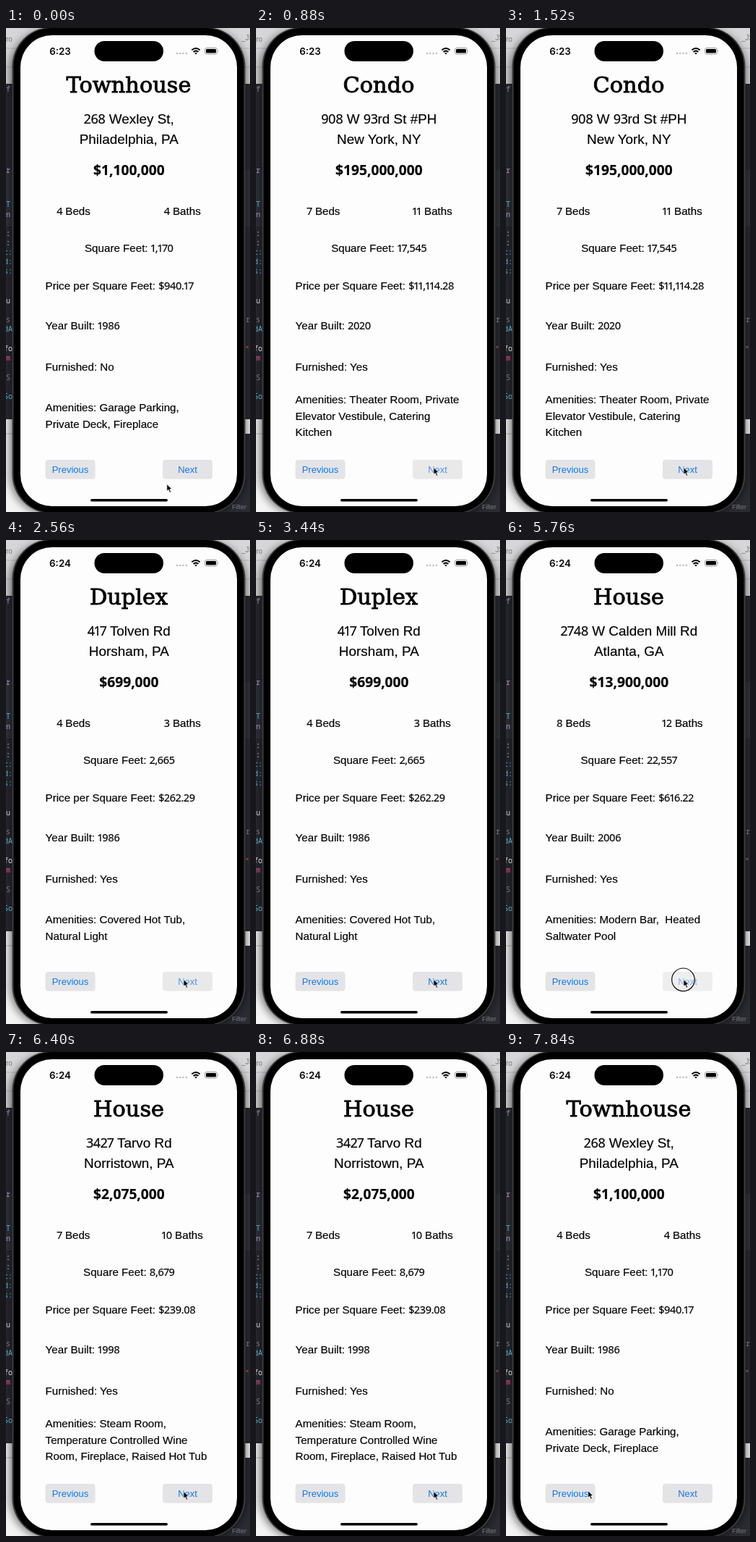
An HTML page for the animation above (8000 ms loop, 338 px wide and 668 px high).

```html
<!DOCTYPE html>
<html lang="en">
<head>
<meta charset="utf-8">
<title>Listings</title>
<style>
html, body { margin: 0; width: 100%; height: 100%; overflow: hidden; background: #26272d; }
svg { display: block; width: 338px; height: 668px; }
text { font-family: "Liberation Sans", Arial, sans-serif; font-size: 15.15px; fill: #050505; white-space: pre; }
#page text { stroke: #050505; stroke-width: .18px; }
#page .title { font-family: "DejaVu Serif", serif; font-size: 30.4px; stroke-width: .9px; }
.mid { text-anchor: middle; }
.num { font-family: "Noto Sans", sans-serif; font-size: .96em; letter-spacing: -.025em; font-variant-numeric: proportional-nums; }
.addr { font-size: 18.9px; }
.price { font-family: "Noto Sans", sans-serif; font-size: 19.2px; font-weight: 700; }
.btn { font-size: 13px; fill: #0a78f5; }
.clock { font-family: Inter, sans-serif; font-size: 13.4px; font-weight: 600; }
.code { font-family: "Noto Sans Mono", monospace; font-size: 10px; }
.ui { font-size: 10px; fill: #77777a; }
</style>
</head>
<body>
<svg viewBox="0 0 338 668">
  <defs>
    <filter id="blur" x="-20%" y="-20%" width="140%" height="140%"><feGaussianBlur stdDeviation="6"/></filter>
  </defs>

  <rect width="338" height="77" fill="#d6d6d8"/>
  <path d="M0 28H338M0 54H338" stroke="#b5b5b8"/>
  <rect y="77" width="338" height="463" fill="#2a2b33"/>
  <rect y="196" width="338" height="78" fill="#32343d"/>
  <rect y="540" width="169" height="128" fill="#f4f4f4"/>
  <rect x="169" y="540" width="169" height="20" fill="#f0f0f0"/>
  <rect x="169" y="560" width="169" height="108" fill="#2a2b33"/>
  <path d="M0 560H169" stroke="#bbb"/>
  <rect x="5" y="2" width="328" height="670" rx="56" opacity=".5" filter="url(#blur)"/>
  <g id="code"></g>
  <text class="ui" x="0" y="19">ro</text>
  <text class="ui" x="326" y="17">_JS</text>
  <text class="ui" x="313" y="664" style="font-size:9px">Filter</text>

  <rect x="8.5" y="-1" width="323" height="671" rx="54" fill="#3c3c3e"/>
  <rect x="10.5" y="0" width="319" height="669" rx="53"/>
  <rect x="20" y="10" width="300" height="650" rx="44" fill="#fdfdfd"/>
  <rect x="122.5" y="18" width="95.5" height="28" rx="14"/>
  <rect x="117" y="650" width="107" height="3.6" rx="1.8"/>

  <text class="clock mid" id="clock" x="75" y="36.5"></text>
  <g fill="#bdbdbf">
    <circle cx="237" cy="35" r="1.3"/><circle cx="241.3" cy="35" r="1.3"/>
    <circle cx="245.6" cy="35" r="1.3"/><circle cx="249.9" cy="35" r="1.3"/>
  </g>
  <g fill="none" stroke="#050505" stroke-width="2">
    <path d="M257.4 30.4Q263 25.6 268.6 30.4M259.6 33.1Q263 30.2 266.4 33.1"/>
    <path d="M261.2 34.8Q263 33.4 264.8 34.8L263 36.6Z" fill="#050505" stroke="none"/>
  </g>
  <rect x="275.5" y="27.5" width="17" height="8.6" rx="2.6" fill="none" stroke="#9c9c9e"/>
  <rect x="277" y="29" width="14" height="5.6" rx="1.4"/>
  <path d="M293.8 30.2q1.6 1.6 0 3.2z" fill="#9c9c9e"/>

  <g id="page"></g>

  <rect x="54.5" y="596" width="69" height="26.5" rx="4" fill="#e4e4e6"/>
  <rect id="nextBox" x="217" y="596" width="69" height="26.5" rx="4" fill="#e4e4e6"/>
  <text class="btn mid" x="89" y="614">Previous</text>
  <text class="btn mid" id="nextText" x="251.5" y="614">Next</text>

  <circle id="ring" cx="245.5" cy="606.8" r="15.8" fill="none" stroke="#0a0a0a" stroke-width="1.2"/>
  <path id="cursor" d="M0 0V9.8L2.3 7.8L4 11.7L5.8 10.9L4.1 7.1H7.2Z" stroke="#fff" stroke-width=".8"/>
</svg>
<script>
const LOOP = 8000, HOLD = 160, FADE = 340;
const $ = id => document.getElementById(id);

const homes = [
  ["Townhouse", "268 Wexley St,", "Philadelphia, PA", "$1,100,000", 4, 4, "1,170", "$940.17", 1986, "No",
    ["Garage Parking,", "Private Deck, Fireplace"]],
  ["Condo", "908 W 93rd St #PH", "New York, NY", "$195,000,000", 7, 11, "17,545", "$11,114.28", 2020, "Yes",
    ["Theater Room, Private", "Elevator Vestibule, Catering", "Kitchen"]],
  ["Duplex", "417 Tolven Rd", "Horsham, PA", "$699,000", 4, 3, "2,665", "$262.29", 1986, "Yes",
    ["Covered Hot Tub,", "Natural Light"]],
  ["House", "356 Bram Way", "Dalton, GA", "$750,000", 6, 3, "2,322", "$323.00", 1997, "No",
    ["Theater Room, Glass", "Walls, Pool, Multiple Terraces"]],
  ["House", "2748 W Calden Mill Rd", "Atlanta, GA", "$13,900,000", 8, 12, "22,557", "$616.22", 2006, "Yes",
    ["Modern Bar,  Heated", "Saltwater Pool"]],
  ["House", "3427 Tarvo Rd", "Norristown, PA", "$2,075,000", 7, 10, "8,679", "$239.08", 1998, "Yes",
    ["Steam Room,", "Temperature Controlled Wine", "Room, Fireplace, Raised Hot Tub"]]
];
const clicks = [560, 2240, 4000, 4880, 5720, 7300];

// Digits use a different face from the letters.
const mix = s => String(s).replace(/\$?\d[\d,.]*\d|\d/g, n => `<tspan class="num">${n}</tspan>`);
const line = (s, x, y, cls = "") => `<text class="${cls}" x="${x}" y="${y}">${mix(s)}</text>`;

function page([kind, street, city, price, beds, baths, area, rate, year, furnished, extras]) {
  const top = extras.length > 2 ? 517.6 : 529;
  return line(kind, 170, 89.4, "title mid") +
    line(street, 170.3, 131.5, "addr mid") +
    line(city, 170.3, 160.2, "addr mid") +
    `<text class="price mid" x="170.4" y="202.8">${price}</text>` +
    line(beds + " Beds", 93.5, 257.5, "mid") +
    line(baths + " Baths", 244.3, 257.5, "mid") +
    line("Square Feet: " + area, 170.3, 309.2, "mid") +
    line("Price per Square Feet: " + rate, 54.6, 360.5) +
    line("Year Built: " + year, 54.6, 416) +
    line("Furnished: " + furnished, 54.6, 472.7) +
    extras.map((s, i) => line(i ? s : "Amenities: " + s, 54.6, top + i * 22.9)).join("");
}

const snippets = [
  ["f", 88, "#8b8d98"], ["r", 200, "#b48ae0"], ["T", 247, "#4fb0cb"], ["n", 261, "#b48ae0"],
  [":", 287, "#ddd"], [":", 300, "#ddd"], ["t:", 313, "#4fb0cb"], ["d:", 326, "#4fb0cb"], ["s:", 339, "#4fb0cb"],
  ["u", 380, "#ccc"], ["s", 406, "#777983"], ["dA", 419, "#4fb0cb"], ["fo", 446, "#ddd"],
  ["m", 459, "#e0508c"], ["S", 486, "#777983"], ["So", 512, "#4fb0cb"]
];
$("code").innerHTML = snippets.map(([s, y, c]) =>
  `<text class="code" x="${s.length > 1 ? -3 : 0}" y="${y}" style="fill:${c}">${s}</text>`).join("") +
  `<text class="code" x="331" y="447" style="fill:#e05a5a">"</text>` +
  `<text class="code" x="332" y="406" style="fill:#777983">r</text>`;

const ease = (t, a, b) => {
  const u = Math.min(1, Math.max(0, (t - a) / (b - a)));
  return u * u * (3 - 2 * u);
};

let shown = -1;
function draw(t) {
  const n = clicks.filter(c => t >= c + HOLD).length % homes.length;
  if (n !== shown) $("page").innerHTML = page(homes[shown = n]);

  const since = t - Math.max(-LOOP, ...clicks.filter(c => t >= c));
  const dim = 1 - ease(since, HOLD, HOLD + FADE);
  $("ring").style.display = since < HOLD ? "" : "none";
  $("nextText").style.opacity = 1 - .5 * dim;
  $("nextBox").style.opacity = 1 - .4 * dim;
  $("clock").textContent = t < 2400 ? "6:23" : "6:24";

  const enter = ease(t, 20, 320), leave = ease(t, 7500, 7840);
  const x = 222.8 + 23.2 * enter - 132.4 * leave;
  const y = 629.5 - 23 * enter - leave;
  $("cursor").setAttribute("transform", `translate(${x} ${y})`);
}

function tick() {
  draw(performance.now() % LOOP);
  requestAnimationFrame(tick);
}
tick();
</script>
</body>
</html>
```
